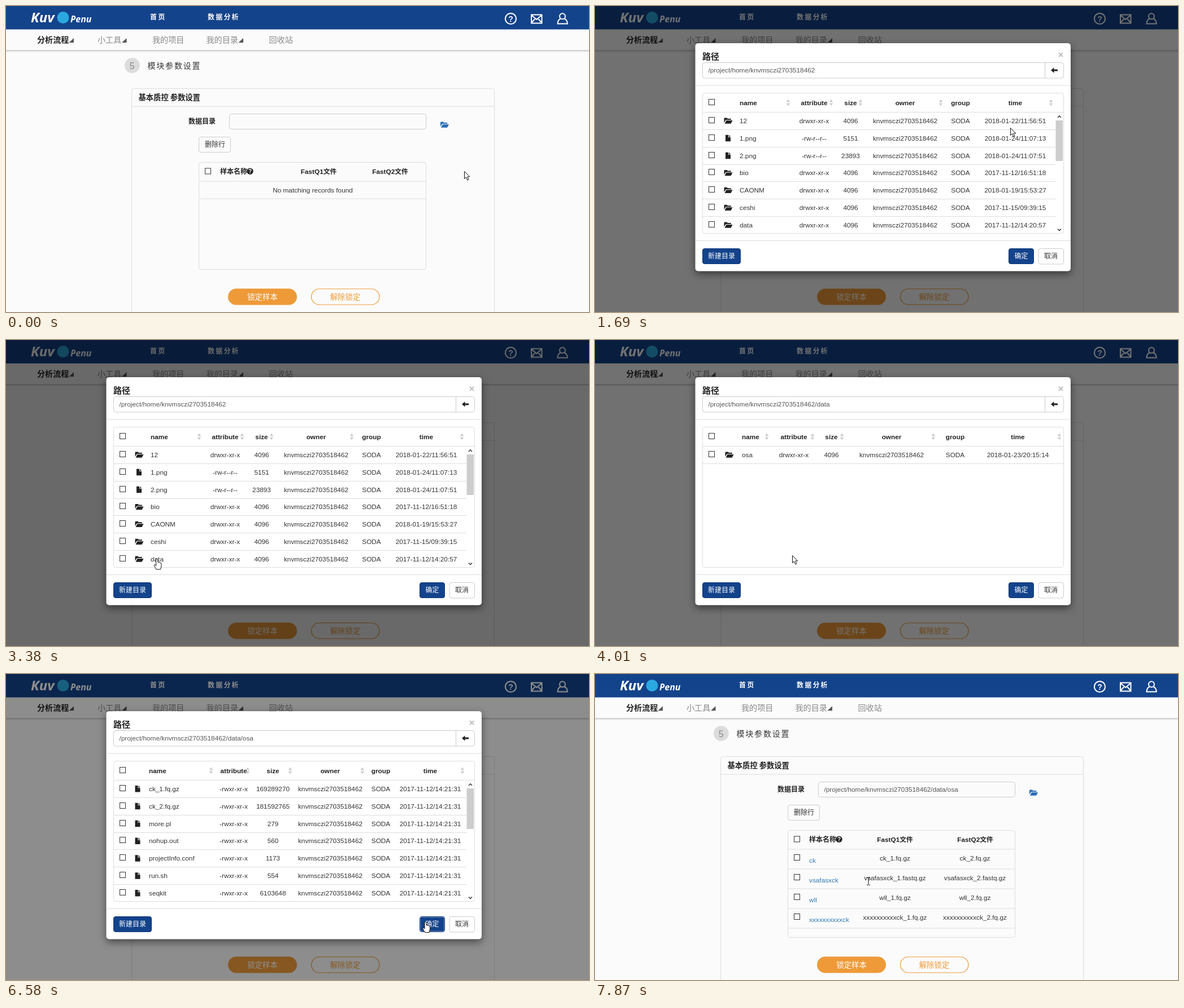
These frames come from a looping animation (1032 by 543 pixels, 8 s). An HTML page:

```html
<!DOCTYPE html>
<html lang="zh">
<head>
<meta charset="utf-8">
<title>模块参数设置</title>
<style>
html, body { margin: 0; width: 100%; height: 100%; overflow: hidden; background: #fbfbfb; }
svg { display: block; width: 1032px; height: 543px; }
text { font-family: "Liberation Sans", Arial, "Noto Sans CJK SC", "Noto Sans CJK", sans-serif; font-size: 11.8px; fill: #333; white-space: pre; }
.m { text-anchor: middle; }
.zh { font-family: "Noto Sans CJK SC", "Noto Sans CJK", sans-serif; font-size: 12px; }
.brand { font: italic 700 24px "Open Sans", sans-serif; fill: #fff; }
.nav { font-size: 14.1px; fill: #888; }
.b { font-weight: 700; fill: #222; }
.w { fill: #fff; }
.link { fill: #337ab7; }
.path { fill: #555; }
.step { fill: #888; }
.close { fill: #bbb; }
.orange { fill: #ee9a38; }
.top { letter-spacing: 2.2px; }
.wide { letter-spacing: 1.8px; }
.line { fill: none; stroke: #ddd; }
.field { fill: none; stroke: #ccc; }
.icon { fill: none; stroke: #fff; stroke-width: 2; }
.box { fill: #fff; stroke: #333; }
.primary { fill: #13438b; stroke: #10387a; }
#shell { filter: drop-shadow(0 5px 7px rgba(0, 0, 0, .5)); }
</style>
</head>
<body>
<svg id="stage" viewBox="0 0 1032 543">
  <defs>
    <g id="folder"><path d="M0 9V1.5Q0 .5 1 .5H5L6.5 2H11.5Q12.5 2 12.5 3V4H4Q3 4 2.5 5Z"/><path d="M4 5H15L12 10.8H1Z"/></g>
    <path id="file" d="M0 0H5V4.2H9V11.5H0ZM6 0L9 3.2H6Z"/>
    <path id="sort" d="M-3.2 -1L0 -6L3.2 -1ZM-3.2 1L0 6L3.2 1Z"/>
    <path id="caret" d="M8.5 -8V0H0Z"/>
  </defs>
  <g id="page"></g>
  <g id="empty"></g>
  <g id="filled"></g>
  <rect id="shade" width="1032" height="543"/>
  <g id="modal"><g id="shell"></g><g id="list0"></g><g id="list1"></g><g id="list2"></g></g>
  <g id="cursor">
    <path id="arrow" d="M.5 .5V13.5L3.5 10.7L5.8 16L8 15L5.8 10H9.8Z" fill="#fff" stroke="#111"/>
    <path id="hand" d="M-1.5 .8Q0 -.6 1.5 .8V6L5 6.8Q8 7.2 8 10V13L6.5 19H-1L-4.6 12.8Q-5.2 10.5 -3.5 10.8L-1.5 12.5Z" fill="#fff" stroke="#111"/>
    <path id="beam" d="M-3 -6.5H-1L0 -5.5L1 -6.5H3M0 -5.5V5.5M-3 6.5H-1L0 5.5L1 6.5H3" fill="none" stroke="#111"/>
  </g>
</svg>
<script>
const $ = id => document.getElementById(id);
const user = 'knvmsczi2703518462';
const home = '/project/home/' + user;

const text = (x, y, s, cls = '', size) =>
  `<text x="${x}" y="${y}" class="${cls}"${size ? ` style="font-size:${size}px"` : ''}>${s}</text>`;
const rect = (x, y, w, h, r, attrs) => `<rect x="${x}" y="${y}" width="${w}" height="${h}" rx="${r}" ${attrs}/>`;
const hline = (x1, x2, y) => `<path class="line" d="M${x1} ${y}H${x2}"/>`;
const use = (id, x, y, fill = '#222') => `<use href="#${id}" x="${x}" y="${y}" fill="${fill}"/>`;
const check = (x, y) => rect(x + .5, y + .5, 10, 10, 0, 'class="box"');

function drawPage() {
  const tabs = [
    [55, '分析流程', 111.5], [162, '小工具', 205], [259, '我的项目'],
    [354.5, '我的目录', 411.5], [465.5, '回收站']
  ];
  return rect(0, 0, 1032, 543, 0, 'fill="#fbfbfb"') +
    rect(0, 0, 1032, 41.5, 0, 'fill="#13438b"') +
    text(44, 29, 'Kuv', 'brand') + '<circle cx="101" cy="20.5" r="10.5" fill="#2aa9e0"/>' +
    text(114, 29, 'Penu', 'brand', 16) +
    text(255, 24, '首页', 'zh b w top') + text(357, 24, '数据分析', 'zh b w top') +
    '<circle class="icon" cx="893.5" cy="22.5" r="9.6"/>' + text(893.5, 27.5, '?', 'b w m', 14) +
    '<path class="icon" d="M930 15.5H948.5V30.5H930ZM930 16L939.2 24L948.5 16M930 30L936.5 22.5M948.5 30L942 22.5"/>' +
    '<path class="icon" d="M981.5 22.5C977.5 24.5 976.5 27 976.5 31.5H993.8C993.8 27 992.5 24.5 988.7 22.5"/>' +
    '<circle class="icon" cx="985" cy="18.2" r="5"/>' +
    tabs.map(([x, s, c], i) =>
      text(x, 64.5, s, 'zh nav' + (i ? '' : ' b')) + (c ? use('caret', c, 65, '#555') : '')).join('') +
    rect(0, 78, 1032, 2, 0, 'fill="#d2d2d2"') + rect(0, 80, 1032, 2, 0, 'fill="#ececec"') +
    '<circle cx="223.3" cy="105.5" r="13.5" fill="#dcdcdc"/>' + text(223.3, 111.5, '5', 'm step', 16) +
    text(250.5, 111, '模块参数设置', 'zh wide', 14) +
    rect(222.5, 146.5, 642, 420, 4, 'class="line"') + hline(223, 864, 178) +
    text(234.5, 166.5, '基本质控 参数设置', 'zh b', 13.3) +
    text(323, 209, '数据目录', 'zh b') + rect(395.5, 191.5, 348, 27, 4, 'class="field"') +
    use('folder', 769, 205, '#2a6db5') +
    rect(341.5, 232.5, 56, 27, 3.5, 'class="field"') + text(352, 250.3, '删除行', 'zh') +
    rect(341.5, 277.5, 402, 190, 4, 'class="line"') + hline(342, 743, 311) +
    check(352, 287.5) + text(379, 298.3, '样本名称', 'zh b') +
    '<circle cx="432" cy="293.3" r="5.7" fill="#222"/>' + text(432, 297, '?', 'b w m', 10) +
    rect(393, 501.5, 122, 29, 14.5, 'class="orange"') + text(454, 521, '锁定样本', 'zh m w', 13.4) +
    rect(540.5, 502, 120.5, 28, 14, 'fill="none" stroke="#ee9a38" stroke-width="1.2"') +
    text(600.5, 521, '解除锁定', 'zh m orange', 13.4);
}

const heads = (a, b) => text(a, 298, 'FastQ1文件', 'b m') + text(b, 298, 'FastQ2文件', 'b m');

function drawFilled() {
  const samples = [['ck', 'fq'], ['vsafasxck', 'fastq'], ['wll', 'fq'], ['xxxxxxxxxxck', 'fq']];
  return heads(531, 673) + text(405.5, 209, home + '/data/osa', 'path') +
    samples.map(([name, ext], i) => {
      const y = 35 * i;
      return check(352, 320 + y) + text(379, 335 + y, name, 'link') +
        text(531, 331 + y, `${name}_1.${ext}.gz`, 'm') + text(672.5, 331 + y, `${name}_2.${ext}.gz`, 'm') +
        hline(342, 743, 346 + y);
    }).join('');
}

function drawShell() {
  return rect(177.5, 66, 664.5, 404.5, 5, 'fill="#fff"') +
    text(190, 95, '路径', 'zh b', 15) + text(824.5, 91.5, '×', 'b m close', 17) +
    rect(190.5, 100.5, 639, 27.5, 4, 'class="field"') + '<path class="field" d="M796.5 100.5V128"/>' +
    '<path d="M807 114L812.5 109.3V112.5H819V115.5H812.5V118.7Z" fill="#222"/>' +
    hline(178, 842, 141) + rect(190.5, 154.5, 639, 249, 4, 'class="line"') + hline(191, 829, 188.5) +
    check(201, 165) + hline(178, 842, 416.5) +
    rect(190.5, 430.5, 67, 27, 3.5, 'class="primary"') + text(200, 448.3, '新建目录', 'zh w') +
    rect(732.5, 430.5, 44, 27, 3.5, 'class="primary"') +
    '<rect id="focus" x="733.5" y="431.5" width="42" height="25" fill="none" stroke="#cdd8e8" stroke-dasharray="1 1"/>' +
    text(742.5, 448.3, '确定', 'zh w') +
    rect(785, 430.5, 44.5, 27.5, 3.5, 'class="field"') + text(795, 448.3, '取消', 'zh');
}

// cols: left edge of name, then centres of attribute, size, owner, group, time
function drawList(dir, cols, sorts, iconX, rows, scroll) {
  const titles = ['name', 'attribute', 'size', 'owner', 'group', 'time'];
  const cell = (s, i, y, cls) => text(cols[i], y, s, cls + (i ? ' m' : ''));
  let out = text(200.5, 118, home + dir, 'path') +
    sorts.map(x => use('sort', x, 171.5, '#ccc')).join('') +
    titles.map((s, i) => cell(s, i, 175.7, 'b')).join('');
  rows.forEach(([name, size, time, mode], r) => {
    const y = 30.83 * r, isDir = mode[0] === 'd';
    out += check(201, Math.round(197 + y)) +
      use(isDir ? 'folder' : 'file', iconX - (isDir ? 7.5 : 5), 198 + y) +
      [name, mode, size, user, 'SODA', time].map((s, i) => cell(s, i, 208 + y, '')).join('');
    if (r < 6) out += hline(191, scroll ? 815 : 829, Math.round(219 + y) + .5);
  });
  if (scroll) out += rect(815.5, 203, 12.5, 72, 0, 'fill="#cdcdcd"') +
    '<path d="M819 198L822 195L825 198M819 395.5L822 398.5L825 395.5" fill="none" stroke="#444" stroke-width="1.6"/>';
  return out;
}

const D = 'drwxr-xr-x', F = '-rw-r--r--', X = '-rwxr-xr-x';
const osaTime = '2017-11-12/14:21:31';

$('page').innerHTML = drawPage();
$('empty').innerHTML = heads(553.5, 680) + text(543, 331, 'No matching records found', 'm') + hline(342, 743, 342);
$('filled').innerHTML = drawFilled();
$('shell').innerHTML = drawShell();
$('list0').innerHTML = drawList('', [256, 388, 452.5, 549, 647, 744], [342, 418, 470, 612, 807], 236, [
  ['12', 4096, '2018-01-22/11:56:51', D],
  ['1.png', 5151, '2018-01-24/11:07:13', F],
  ['2.png', 23893, '2018-01-24/11:07:51', F],
  ['bio', 4096, '2017-11-12/16:51:18', D],
  ['CAONM', 4096, '2018-01-19/15:53:27', D],
  ['ceshi', 4096, '2017-11-15/09:39:15', D],
  ['data', 4096, '2017-11-12/14:20:57', D]
], true);
$('list1').innerHTML = drawList('/data', [260, 352, 418.5, 525, 637.5, 748.5], [304, 385, 437, 599, 822], 238,
  [['osa', 4096, '2018-01-23/20:15:14', D]], false);
$('list2').innerHTML = drawList('/data/osa', [253, 403, 472.5, 574, 663.5, 751], [363, 428, 503, 631, 808], 233.5,
  [['ck_1.fq.gz', 169289270], ['ck_2.fq.gz', 181592765], ['more.pl', 279], ['nohup.out', 560],
   ['projectInfo.conf', 1173], ['run.sh', 554], ['seqkit', 6103648]].map(r => [...r, osaTime, X]), true);

// The screen holds between captures, so every track is stepped: [time, ...values]
const moves = [
  [0, 811, 293, 'arrow'], [210, 806, 281, 'arrow'], [420, 793, 249, 'arrow'], [630, 780, 218, 'arrow'],
  [840, 776, 208, 'hand'], [1270, 774, 207, 'arrow'], [1690, 735, 216, 'arrow'], [1900, 610, 250, 'beam'],
  [2110, 514, 273, 'beam'], [2320, 450, 304, 'beam'], [2530, 370, 345, 'arrow'], [2740, 310, 372, 'arrow'],
  [2950, 275, 386, 'hand'], [3170, 267, 388, 'hand'], [3800, 300, 386, 'arrow'], [4010, 349, 382, 'arrow'],
  [4220, 300, 278, 'arrow'], [4440, 277, 226, 'arrow'], [4650, 268, 202, 'hand'], [5310, 430, 282, 'arrow'],
  [5520, 636.5, 376, 'arrow'], [5730, 705, 418, 'arrow'], [5940, 735, 434, 'hand'], [6150, 742.5, 439.5, 'hand'],
  [7000, 755, 436, 'arrow'], [7210, 805, 414, 'arrow'], [7430, 849, 396, 'arrow'], [7650, 690, 378, 'arrow'],
  [7870, 484, 368, 'beam']
];
const shades = [
  [0, 0], [1270, .42], [1480, .5], [1690, .55], [1900, .6], [2110, .66], [2320, .64], [3380, .58], [3800, .55],
  [4220, .57], [5310, .62], [5520, .68], [5940, .64], [6580, .44], [6790, .22], [7000, 0]
];
const modals = [[0, 0, -60], [1480, .6, -20], [1690, 1, 0], [6790, .4, -30], [7000, 0, -60]];
const lists = [[0, 0], [3590, 1], [5310, 2]];

const at = (track, t) => track.filter(k => k[0] <= t).pop();
const show = (id, on) => { $(id).style.display = on ? '' : 'none'; };

function frame(now) {
  const t = now % 8000;
  const [, x, y, kind] = at(moves, t);
  const [, alpha, drop] = at(modals, t);
  const list = at(lists, t)[1];
  $('cursor').setAttribute('transform', `translate(${x} ${y})`);
  ['arrow', 'hand', 'beam'].forEach(k => show(k, k === kind));
  $('shade').setAttribute('opacity', at(shades, t)[1]);
  $('modal').setAttribute('opacity', alpha);
  $('modal').setAttribute('transform', `translate(0 ${drop})`);
  show('modal', alpha > 0);
  [0, 1, 2].forEach(i => show('list' + i, i === list));
  show('empty', t < 6790);
  show('filled', t >= 6790);
  show('focus', t >= 6580);
  requestAnimationFrame(frame);
}
frame(performance.now());
</script>
</body>
</html>
```
